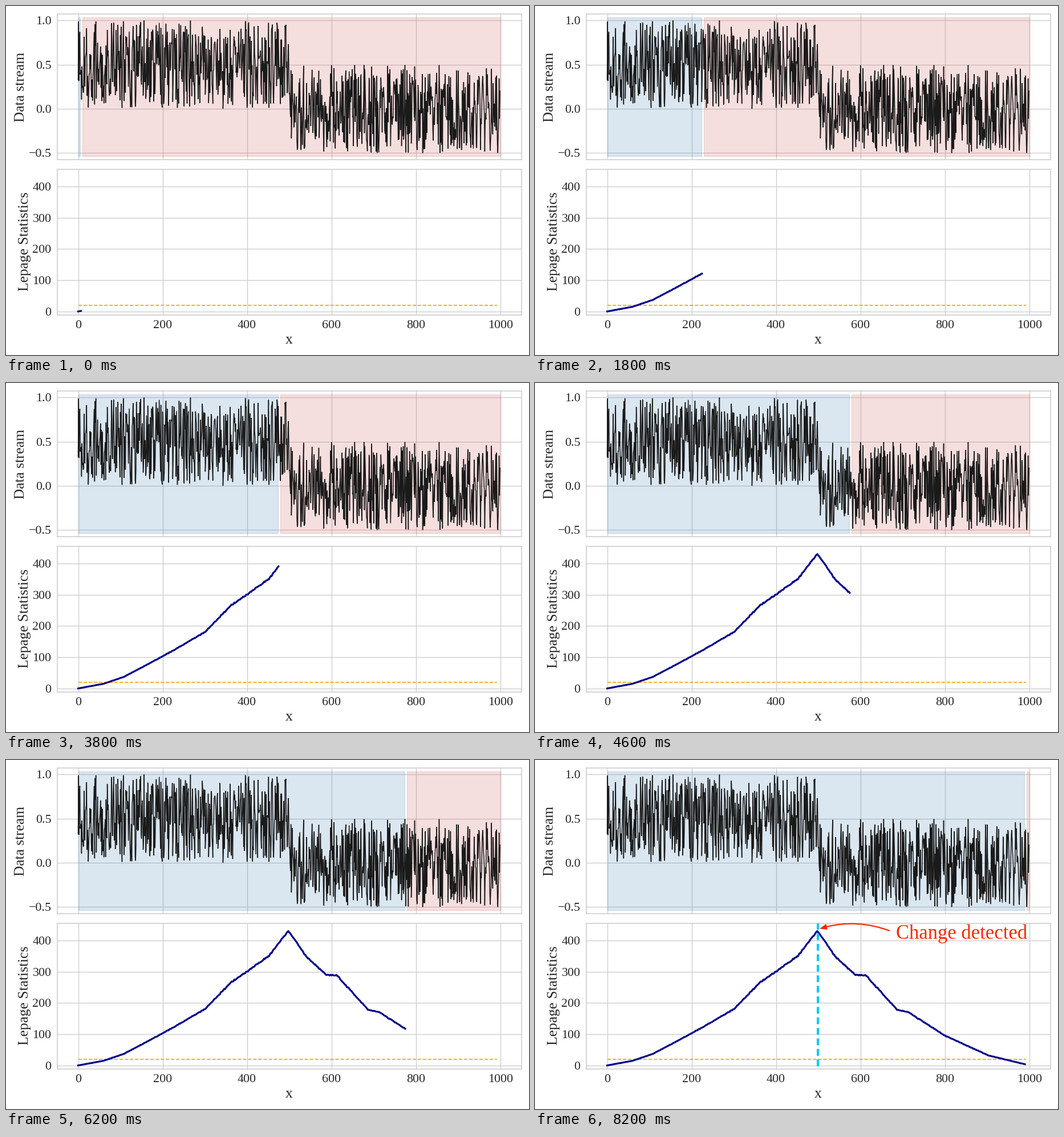
A matplotlib script for the animation above (9.4 s loop, 917x611 px).

```python
import numpy as np
import matplotlib.pyplot as plt
from matplotlib.animation import FuncAnimation
from matplotlib.patches import PathPatch, Polygon, Rectangle
from matplotlib.path import Path

W, H, DPI = 917, 611, 64
INK, GRID, RED = "#262626", "#cccccc", "#ff2600"
STEPS, HOLD = 41, 6
CHANGE, LAST = 500, 992


def pt(px):
    return px * 72 / DPI


plt.rcParams.update({
    "font.family": "Liberation Serif",
    "text.color": INK,
    "xtick.labelcolor": INK,
    "ytick.labelcolor": INK,
})
fig = plt.figure(figsize=(W / DPI, H / DPI), dpi=DPI, facecolor="white")


def panel(top, bottom, ylim, yticks):
    left, right = 89.5, 903.5
    ax = fig.add_axes([left / W, 1 - bottom / H, (right - left) / W, (bottom - top) / H])
    ax.set(xlim=(-50, 1049.6), ylim=ylim, xticks=range(0, 1001, 200), yticks=yticks)
    ax.set_axisbelow(True)
    ax.grid(color=GRID, lw=pt(1.3))
    ax.tick_params(length=0, pad=pt(10), labelsize=pt(22))
    for side in ax.spines.values():
        side.set(color=GRID, lw=pt(1.6))
    return ax


def label(x, y, text, rotation=0):
    fig.text(x / W, 1 - y / H, text, size=pt(25.5), rotation=rotation,
             ha="center", va="baseline", rotation_mode="anchor")


def make_stream():
    """Uniform noise whose mean drops by a half in the middle."""
    x = np.arange(1000)
    noise = np.random.default_rng(8).random(x.size)
    return x, noise - 0.5 * (x >= CHANGE)


def make_statistic():
    """Climb to the change point and fall back, with a little roughness."""
    x = np.arange(0, LAST + 1, 2)
    trend = np.interp(
        x,
        [0, 60, 110, 222, 300, 360, 450, 498, 541, 588, 613, 686, 713, 799, 903, LAST],
        [0, 15, 38, 119, 180, 263, 348, 431, 347, 290, 288, 179, 171, 96, 32, 3])
    noise = np.random.default_rng(5).normal(0, 1, x.size)
    return x, trend + noise * np.sqrt(trend / 300)


def span(color):
    box = Rectangle((0, -0.536), 1, 1.572, color=color, alpha=0.2,
                    lw=pt(1.3), zorder=1)
    stream_ax.add_patch(box)
    return box


def stage(*points):
    """Turn pixels measured from the top left into display points."""
    return [(x, H - y) for x, y in points]


def annotation():
    """Marker line, caption and arrow."""
    line, = stat_ax.plot([499, 499], [456, -10], color="#00c8ff", lw=pt(4),
                         dashes=(3, 1.6), zorder=4)
    caption = fig.text(633 / W, 1 - 313 / H, "Change detected", color=RED,
                       size=pt(34.6), va="baseline")
    bend = Path(stage((622, 299), (565, 278), (509, 292.5)),
                [Path.MOVETO, Path.CURVE3, Path.CURVE3])
    shaft = PathPatch(bend, fc="none", ec=RED, lw=pt(2.2), transform=None)
    head = Polygon(stage((499, 295.5), (510.5, 286.8), (512.8, 296.8)),
                   fc=RED, ec="none", transform=None)
    fig.add_artist(shaft)
    fig.add_artist(head)
    return [line, caption, shaft, head]


stream_ax = panel(14, 268.5, (-0.572, 1.074), [-0.5, 0, 0.5, 1])
stream_ax.tick_params(labelbottom=False)
stat_ax = panel(285.5, 540.5, (-10.5, 455.5), range(0, 401, 100))
label(32.5, 142, "Data stream", 90)
label(38.5, 412.5, "Lepage Statistics", 90)
label(496, 591, "x")

seen, ahead = span("steelblue"), span("indianred")
stream_ax.plot(*make_stream(), color="#1a1a1a", lw=pt(1.5), zorder=2)
stat_ax.plot([0, LAST], [20, 20], color="orange", lw=pt(1.7), ls="--", zorder=2)
stat_x, stat_y = make_statistic()
curve, = stat_ax.plot([], [], color="#00008b", lw=pt(3.2), zorder=3)
notes = annotation()


def draw(frame):
    step = min(frame, STEPS)
    edge = np.clip(25 * step - 2, 5, LAST - 4)
    start = edge + 5.5
    seen.set_width(edge)
    ahead.set_x(start)
    ahead.set_width(1000 - start)
    xs = np.append(stat_x[stat_x < edge], edge + 1.5)
    curve.set_data(xs, np.interp(xs, stat_x, stat_y))
    for part in notes:
        part.set_visible(step == STEPS)
    return [seen, ahead, curve, *notes]


anim = FuncAnimation(fig, draw, frames=STEPS + HOLD, interval=200,
                     repeat=True, repeat_delay=0, blit=False)
plt.show()
```
